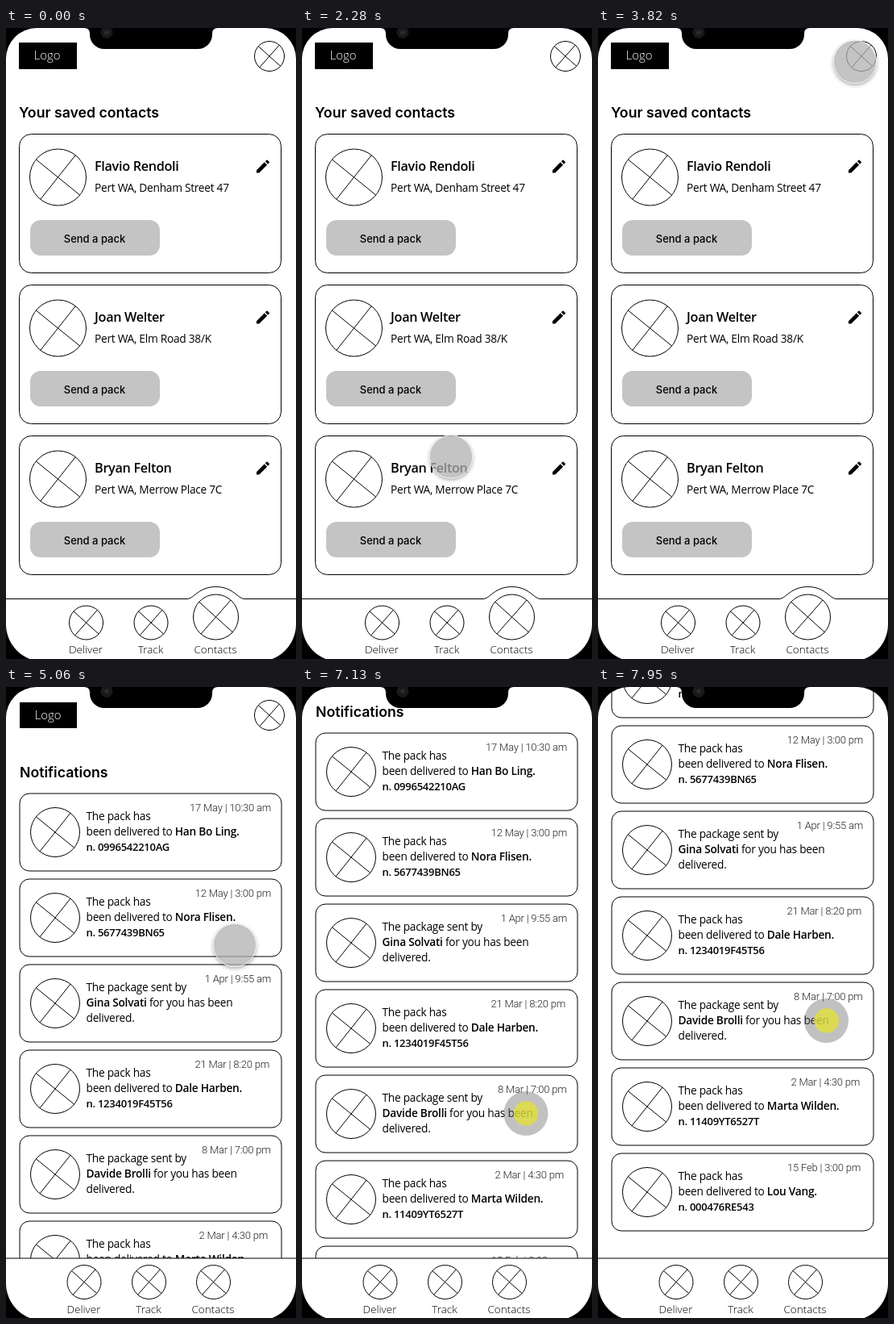
Animation of 360 by 782 pixels, one loop 8000 ms. Source, as an HTML page with a canvas:

```html
<!DOCTYPE html>
<html lang="en">
<head>
<meta charset="utf-8">
<title>Delivery app wireframe</title>
<style>
  html, body { margin: 0; width: 100%; height: 100%; overflow: hidden; background: #fff; }
  canvas { display: block; width: 360px; height: 782px; }
</style>
</head>
<body>
<canvas id="stage"></canvas>
<script>
const W = 360, H = 782, LOOP = 8000;
const PAGE_SWITCH = 4310, DRAG_START = 6640, GRAB_Y = 603.5;
const BODY = '"Open Sans", "Noto Sans", sans-serif';
const HEAD = 'Inter, sans-serif';
const THIN = 'Roboto, sans-serif';

const canvas = document.getElementById('stage');
const ctx = canvas.getContext('2d');
const ratio = window.devicePixelRatio || 1;
canvas.width = W * ratio;
canvas.height = H * ratio;

const contacts = [
  ['Flavio Rendoli', 'Pert WA, Denham Street 47'],
  ['Joan Welter', 'Pert WA, Elm Road 38/K'],
  ['Bryan Felton', 'Pert WA, Merrow Place 7C']
];

// date, right edge of date, person, parcel code (none for incoming parcels)
const notices = [
  ['17 May | 10:30 am', 329, 'Han Bo Ling', '0996542210AG'],
  ['12 May | 3:00 pm', 329, 'Nora Flisen', '5677439BN65'],
  ['1 Apr | 9:55 am', 329, 'Gina Solvati', ''],
  ['21 Mar | 8:20 pm', 327, 'Dale Harben', '1234019F45T56'],
  ['8 Mar | 7:00 pm', 328.5, 'Davide Brolli', ''],
  ['2 Mar | 4:30 pm', 325, 'Marta Wilden', '11409YT6527T'],
  ['15 Feb | 3:00 pm', 326, 'Lou Vang', '000476RE543']
];

// pointer path: time, x, y
const path = [
  [1170, 308, 814], [1180, 306, 800], [1400, 257, 692], [1650, 204, 598],
  [1880, 187, 549], [1950, 186, 545], [2270, 186, 545], [2280, 185, 532],
  [2450, 190, 455], [2700, 232, 290], [2900, 271, 183], [3050, 291, 130],
  [3350, 310, 76], [3820, 319, 42], [3890, 320, 39], [4300, 324, 33],
  [4710, 324, 33], [4780, 322, 48], [4920, 303, 168], [5060, 284, 319],
  [5200, 278, 452], [5340, 276, 548], [5470, 276, 588], [5940, 276, 588],
  [6200, 270, 603], [6440, 266, 611], [6640, 266, 611], [6710, 265, 609],
  [6850, 267, 594], [7000, 273, 562], [7200, 280, 512], [7400, 284, 474],
  [7540, 284, 455.5], [7950, 283.5, 413.5]
];

// smooth interpolation that never overshoots its points
function along(t, axis) {
  const last = path.length - 1;
  if (t <= path[0][0]) return path[0][axis];
  if (t >= path[last][0]) return path[last][axis];
  const i = path.findIndex(p => p[0] > t) - 1;
  const rise = k => (path[k + 1][axis] - path[k][axis]) / (path[k + 1][0] - path[k][0]);
  const slope = k => {
    if (k === 0 || k === last) return 0;
    const a = rise(k - 1), b = rise(k);
    return a * b <= 0 ? 0 : 2 * a * b / (a + b);
  };
  const span = path[i + 1][0] - path[i][0];
  const u = (t - path[i][0]) / span, v = 1 - u;
  return path[i][axis] * (1 + 2 * u) * v * v + slope(i) * span * u * v * v
    + path[i + 1][axis] * u * u * (3 - 2 * u) - slope(i + 1) * span * u * u * v;
}

function text(str, x, y, font, { gap = 0, align = 'left', color = '#000' } = {}) {
  ctx.font = font;
  ctx.letterSpacing = gap + 'px';
  ctx.textAlign = align;
  ctx.fillStyle = color;
  ctx.fillText(str, x, y);
  return x + ctx.measureText(str).width;
}

function outline() {
  ctx.strokeStyle = '#000';
  ctx.lineWidth = 1;
  ctx.stroke();
}

function box(x, y, w, h, r) {
  ctx.beginPath();
  ctx.roundRect(x, y, w, h, r);
}

function disc(x, y, r, fill) {
  ctx.beginPath();
  ctx.arc(x, y, r, 0, Math.PI * 2);
  ctx.fillStyle = fill;
  ctx.fill();
}

// placeholder picture: circle with two crossing diameters
function placeholder(x, y, r, tilt = 42) {
  ctx.beginPath();
  ctx.arc(x, y, r, 0, Math.PI * 2);
  for (const deg of [tilt, tilt - 90.5]) {
    const dx = r * Math.cos(deg * Math.PI / 180), dy = r * Math.sin(deg * Math.PI / 180);
    ctx.moveTo(x - dx, y - dy);
    ctx.lineTo(x + dx, y + dy);
  }
  outline();
}

const pencil = new Path2D('M3 17.25V21h3.75L17.81 9.94l-3.75-3.75L3 17.25zM20.71 7.04c.39-.39.39-1.02 0-1.41l-2.34-2.34c-.39-.39-1.02-.39-1.41 0l-1.83 1.83 3.75 3.75 1.83-1.83z');

function drawPencil(x, y) {
  ctx.save();
  ctx.translate(x - 10.7, y - 10.7);
  ctx.scale(0.89, 0.89);
  ctx.fillStyle = '#000';
  ctx.fill(pencil);
  ctx.restore();
}

function header(title, x, dy) {
  ctx.fillStyle = '#000';
  ctx.fillRect(x, 18 + dy, 88 - x, 33 - dy);
  text('Logo', x + 35, 39 + dy / 2, '300 15px ' + BODY, { align: 'center', color: '#fff' });
  placeholder(327, 35, 18.5);
  text(title, x, 111 + dy / 2, '600 17.7px ' + HEAD);
}

function navItem(label, x, y, r, baseline) {
  placeholder(x, y, r);
  text(label, x - 0.5, baseline, '300 13.5px ' + BODY, { align: 'center' });
}

function navBar(y, bump) {
  ctx.beginPath();
  ctx.moveTo(-2, y);
  if (bump) {
    ctx.lineTo(225, y);
    ctx.bezierCurveTo(233, y, 239, 692.5, 260.5, 692.5);
    ctx.bezierCurveTo(282, 692.5, 288, y, 296, y);
  }
  ctx.lineTo(W + 2, y);
  ctx.lineTo(W + 2, H + 2);
  ctx.lineTo(-2, H + 2);
  ctx.closePath();
  ctx.fillStyle = '#fff';
  ctx.fill();
  outline();
}

function contactsPage() {
  header('Your saved contacts', 16, 0);
  contacts.forEach(([name, address], i) => {
    const y = 131.5 + i * 187;
    box(16.5, y, 325, 172, 15);
    outline();
    placeholder(64.5, y + 53.5, 35, 39);
    text(name, 110, y + 45.5, '600 16.2px ' + BODY, { gap: -0.3 });
    text(address, 110, y + 71, '13.7px ' + BODY, { gap: -0.25 });
    drawPencil(319, y + 40);
    box(30, y + 106.5, 161, 44, 13);
    ctx.fillStyle = '#c4c4c4';
    ctx.fill();
    text('Send a pack', 110, y + 134, '500 13px ' + HEAD, { align: 'center' });
  });
  navBar(707.5, true);
  navItem('Deliver', 99.5, 737, 21, 775);
  navItem('Track', 180, 737, 21, 775);
  navItem('Contacts', 260.5, 730, 28, 775);
}

function notice([date, right, person, code], y) {
  const plain = '13.7px ' + BODY, bold = '600 13.7px ' + BODY, gap = { gap: -0.25 };
  box(17, y, 325, 96, 12);
  outline();
  placeholder(61, y + 48, 30.5, 39);
  text(date, right, y + 21.5, '300 13px ' + THIN, { gap: -0.2, align: 'right', color: '#222' });
  if (code) {
    text('The pack has', 99.5, y + 33, plain, gap);
    const x = text('been delivered to ', 99.5, y + 52, plain, gap);
    text(person + '.', x, y + 52, bold, gap);
    text('n. ' + code, 99.5, y + 71, '600 13px ' + BODY, { gap: -0.25 });
  } else {
    text('The package sent by', 99.5, y + 33, plain, gap);
    const x = text(person, 99.5, y + 52, bold, gap);
    text(' for you has been', x, y + 52, plain, gap);
    text('delivered.', 99.5, y + 71, plain, gap);
  }
}

function noticesPage(scroll) {
  ctx.save();
  ctx.translate(0, -scroll);
  header('Notifications', 17, 1);
  notices.forEach((item, i) => notice(item, 132 + i * 106));
  ctx.restore();
  navBar(708, false);
  navItem('Deliver', 97, 737.5, 21, 775.5);
  navItem('Track', 177.5, 737.5, 21, 775.5);
  navItem('Contacts', 257.5, 737.5, 21, 775.5);
}

function pointer(x, y, pressed) {
  if (pressed) {
    disc(x, y, 27.5, 'rgba(100,100,100,.4)');
    disc(x, y, 15.3, 'rgba(228,226,50,.76)');
    return;
  }
  // shadow only outside the translucent disc
  ctx.save();
  ctx.beginPath();
  ctx.rect(x - 60, y - 60, 120, 120);
  ctx.arc(x, y, 27, 0, Math.PI * 2);
  ctx.clip('evenodd');
  ctx.shadowColor = 'rgba(0,0,0,.4)';
  ctx.shadowBlur = 5 * ratio;
  ctx.shadowOffsetY = 2 * ratio;
  disc(x, y, 26.5, '#fff');
  ctx.restore();
  disc(x, y, 27, 'rgba(176,176,176,.74)');
  ctx.beginPath();
  ctx.arc(x, y, 26.7, 0, Math.PI * 2);
  ctx.strokeStyle = 'rgba(255,255,255,.8)';
  ctx.lineWidth = 1;
  ctx.stroke();
}

function phoneFrame() {
  ctx.fillStyle = '#000';
  ctx.beginPath();
  ctx.rect(-1, -1, W + 2, H + 4);
  ctx.roundRect(0, 0, W, H + 3, [38, 38, 46, 46]);
  ctx.fill('evenodd');
  ctx.beginPath();
  ctx.moveTo(97, 0);
  ctx.quadraticCurveTo(104, 0, 104, 7);
  ctx.arcTo(104, 26, 124, 26, 18);
  ctx.arcTo(256, 26, 256, 7, 18);
  ctx.lineTo(256, 7);
  ctx.quadraticCurveTo(256, 0, 263, 0);
  ctx.fill();
  disc(125, 5.5, 7.5, '#191919');
  disc(125, 5.5, 3, '#2b2b2b');
}

function draw(t) {
  ctx.setTransform(ratio, 0, 0, ratio, 0, 0);
  ctx.fillStyle = '#fff';
  ctx.fillRect(0, 0, W, H);
  const x = along(t, 1), y = along(t, 2);
  const tapping = t >= 4060 && t < 4270;
  const dragging = t >= DRAG_START;
  if (t < PAGE_SWITCH) contactsPage();
  else noticesPage(dragging ? Math.max(0, GRAB_Y - y) : 0);
  if (t >= 1180) pointer(x, y, tapping || dragging);
  phoneFrame();
}

const start = performance.now();
function tick() {
  draw((performance.now() - start) % LOOP);
  requestAnimationFrame(tick);
}
tick();
</script>
</body>
</html>
```
